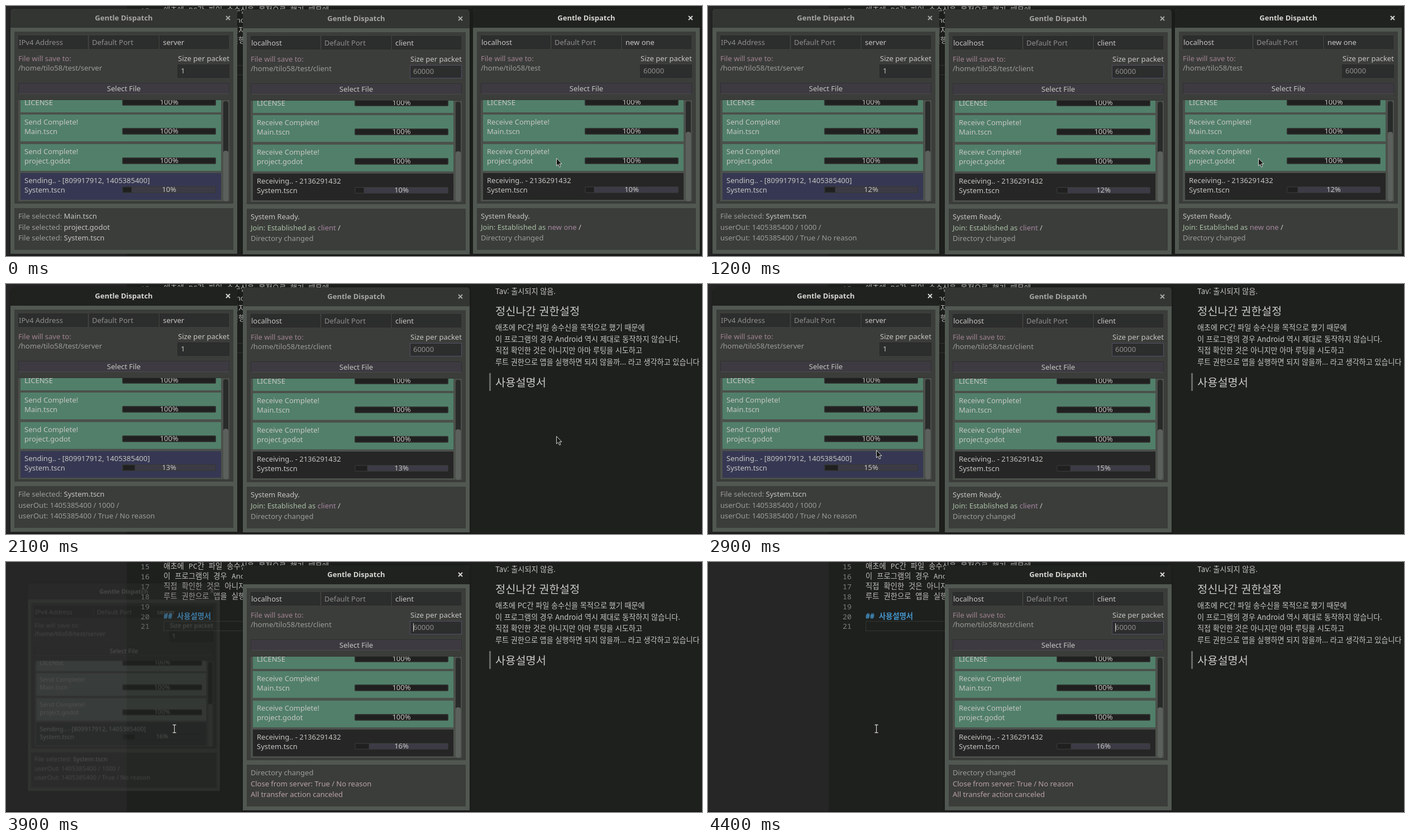
An HTML page for the animation above (4.9 s loop, 1246 px wide and 449 px high).

```html
<!DOCTYPE html>
<html lang="ko">
<head>
<meta charset="utf-8">
<title>Gentle Dispatch</title>
<style>
html, body { margin: 0; width: 100%; height: 100%; overflow: hidden; background: #1e201e; }
body { position: relative; }
div, span.t, svg { position: absolute; box-sizing: border-box; }
#stage { left: 0; top: 0; width: 1246px; height: 449px; overflow: hidden; background: #1e201e;
  font: 500 13px/20px "Noto Sans", "Open Sans", sans-serif; color: #c6c6c2; }
.t { white-space: pre; line-height: 20px; }
.dim { color: #9c9d99; }
.hint { color: #8f908d; }
.pink { color: #a08391; }
.rose { color: #b9a1a8; }
.name { color: #a585a0; }
.ok { color: #a9c0a5; }
.mid { text-align: center; white-space: pre; }

/* editor and preview behind the windows */
.side { background: #252625; }
.code { font: 13.3px/20px "Noto Sans Mono", "Noto Sans CJK KR", "Noto Sans CJK", monospace; color: #c0c1bd; }
.no { color: #7d807c; }
.head { color: #4596cd; font-weight: 700; }
.doc { font: 13.1px/20px "Noto Sans CJK KR", "Noto Sans CJK", sans-serif; color: #c8c9c5; }
.big { font-size: 19.8px; }
.line { border: 1px solid #343633; }
.rule { background: #666966; }
.edge { background: #101110; }

/* transfer window */
.win { background: #515751; border-radius: 6px 6px 0 0; box-shadow: 0 0 5px rgba(0,0,0,.3); }
.title { background: #333533; color: #a6a7a3; border-radius: 6px 6px 0 0; font-weight: 700; line-height: 33px; }
.title svg { left: 385px; top: 12px; stroke: currentColor; stroke-width: 2; }
.active .title { background: #20221f; color: #d6d6d2; }
.panel { background: #3b3d3a; }
.field { background: #2c2d2d; border: 1px solid #282929; }
.lit { border-color: #505066; }
.button { background: #3d3a41; border: 1px solid #302f33; border-bottom-color: #4b494e; line-height: 18px; }
.list { background: #4b504b; border: solid #343734; border-width: 1px 0; overflow: hidden; }
.done { background: #517f6a; }
.send { background: #363853; }
.recv { background: #252625; }
.bar { background: #3c3b45; border: 1px solid #333634; border-radius: 2px; }
.fill { background: #1f201f; border: 1px solid #2a2c2a; }
.track { background: #292a2a; border-radius: 4px; }
.thumb { background: #5c605c; border-radius: 4px; }
.caret { background: #d0d0cc; visibility: hidden; }
.active .caret { visibility: visible; }
[hidden] { display: none; }

#server { animation: shutLeft 4900ms step-end infinite; }
#extra { animation: shutRight 4900ms step-end infinite; }
#arrow { left: 0; top: 0; animation: point 4900ms step-end infinite; }
#beam { left: 297px; top: 291px; animation: beam 4900ms step-end infinite; }
@keyframes shutRight {
  0% { opacity: 1; transform: none; filter: none; }
  26.53% { opacity: .1; transform: scale(.83); filter: grayscale(.8); }
  28.57% { opacity: .05; transform: scale(.81); filter: grayscale(.8); }
  30.61% { opacity: .02; transform: scale(.8); filter: grayscale(.8); }
  32.65%, 100% { opacity: 0; transform: scale(.8); filter: grayscale(.8); }
}
@keyframes shutLeft {
  0% { opacity: 1; transform: none; filter: none; }
  79.59% { opacity: .28; transform: scale(.847); filter: grayscale(.8); }
  81.63% { opacity: .08; transform: scale(.81); filter: grayscale(.8); }
  83.67%, 100% { opacity: 0; transform: scale(.8); filter: grayscale(.8); }
}
@keyframes point {
  0% { transform: translate(984px, 272px); opacity: 1; }
  48.97% { transform: translate(984px, 272px); animation-timing-function: steps(3); }
  55.1% { transform: translate(500px, 258px); animation-timing-function: steps(2); }
  59.18% { transform: translate(300px, 297px); opacity: 1; }
  79.59%, 100% { transform: translate(300px, 297px); opacity: 0; }
}
@keyframes beam {
  0% { opacity: 0; }
  79.59%, 100% { opacity: 1; }
}
</style>
</head>
<body>
<div id="stage"></div>
<script>
const LOOP = 4900;
const stage = document.getElementById('stage');

const text = (x, y, s, c = '') =>
  `<span class="t ${c}" style="left:${x}px;top:${y - 10}px">${s}</span>`;
const box = (x, y, w, h, c, inner = '', id = '') =>
  `<div ${id && `id="${id}"`} class="${c}" style="left:${x}px;top:${y}px;width:${w}px;height:${h}px">${inner}</div>`;
const tint = (c, s) => `<span class="${c}">${s}</span>`;

const PROSE = [
  '애초에 PC간 파일 송수신을 목적으로 했기 때문에',
  '이 프로그램의 경우 Android 역시 제대로 동작하지 않습니다.',
  '직접 확인한 것은 아니지만 아마 루팅을 시도하고',
  '루트 권한으로 앱을 실행하면 되지 않을까... 라고 생각하고 있습니다'
];

function backdrop() {
  let code = box(0, 0, 216, 449, 'side') + box(282, 106, 540, 18, 'line');
  let doc = text(876, 13, 'Tav: 출시되지 않음.', 'doc') + text(876, 48, '정신나간 권한설정', 'doc big');
  for (let i = 0; i < 7; i++) code += text(241, 8 + i * 17.9, 15 + i, 'code no');
  PROSE.forEach((s, i) => {
    code += text(282, 7 + i * 17.9, s, 'code');
    doc += text(876, 78 + i * 20.7, s, 'doc');
  });
  code += text(282, 96.5, '## 사용설명서', 'code head');
  doc += box(865, 160, 3, 32, 'rule') + text(876, 176, '사용설명서', 'doc big');
  return code + doc + box(0, 448, 1246, 1, 'edge');
}

function card(i, kind, status, name) {
  const live = kind !== 'done';
  const fill = box(0, 0, 166, 10, live ? 'fill live' : 'fill');
  const label = `<div class="mid${live ? ' pct' : ''}" style="left:0;width:166px;top:-6px">100%</div>`;
  return box(4, 131 - 52.5 * (3 - i), 359, 48, kind,
    text(7, 13, status) + text(7, 30, name) + box(182, 24, 168, 12, 'bar', fill + label));
}

function win(o) {
  const done = o.verb + ' Complete!';
  const names = ['LICENSE', 'Main.tscn', 'project.godot'];
  const cards = names.map((n, i) => card(i, 'done', done, n)).join('') +
    card(3, o.kind, o.status, 'System.tscn');
  const cross = '<svg width="9" height="9"><path d="M1 1 8 8M8 1 1 8"/></svg>';
  const fields = o.fields.map(([s, c], i) =>
    box(14 + i * 126.5, 48, 124, 24, 'field') + text([15, 146, 273][i], 59.5, s, c)).join('');
  const logs = o.logs.map(lines => '<div class="log">' +
    lines.map((s, i) => text(14, 372 + i * 19.7, s)).join('') + '</div>').join('');
  return box(o.x, o.y, 406, 440, 'win',
    box(0, 0, 406, 34, 'title mid', 'Gentle Dispatch' + cross) +
    box(7, 41, 392, 309, 'panel') + box(7, 358, 392, 75, 'panel') +
    fields +
    text(14, 89, 'File will save to:', 'pink') + text(14, 106, o.path, 'dim') +
    text(300, 89, 'Size per packet') +
    box(299, 100, 93, 24, 'field' + (o.lit ? ' lit' : '')) +
    text(305, 111, o.size, o.size > 1 ? 'hint' : '') +
    (o.lit ? box(305, 104, 1, 15, 'caret') : '') +
    box(14, 133, 378, 20, 'button mid', 'Select File') +
    box(14, 163, 378, 184, 'list', cards +
      box(367, 2, 9, 180, 'track') + box(367, o.thumb, 9, 182 - o.thumb, 'thumb')) +
    logs, o.id);
}

const picked = n => tint('dim', 'File selected: ') + n;
const out = s => tint('dim', 'userOut: 1405385400 / ' + s);
const joined = n => tint('ok', 'Join: Established as ') + tint('name', n) + ' /';
const changed = tint('dim', 'Directory changed');
const closed = tint('rose', 'Close from server: True / No reason');
const canceled = tint('rose', 'All transfer action canceled');
const port = ['Default Port', 'hint'];

const serverLog = [picked('Main.tscn'), picked('project.godot'), picked('System.tscn'),
  out('1000 /'), out('True / No reason')];
const clientLog = ['System Ready.', joined('client'), changed, closed, canceled];
const views = log => [0, 1, 2].map(i => log.slice(i, i + 3));

const windows = [
  { id: 'server', x: 8, y: 5, verb: 'Send', kind: 'send', thumb: 91, size: '1',
    status: 'Sending.. - [809917912, 1405385400]', path: '/home/tilo58/test/server',
    fields: [['IPv4 Address', 'hint'], port, ['server']], logs: views(serverLog) },
  { id: 'client', x: 424, y: 6, verb: 'Receive', kind: 'recv', thumb: 91, size: '60000', lit: true,
    status: 'Receiving.. - 2136291432', path: '/home/tilo58/test/client',
    fields: [['localhost'], port, ['client']], logs: views(clientLog) },
  { id: 'extra', x: 836, y: 5, verb: 'Receive', kind: 'recv', thumb: 57, size: '60000',
    status: 'Receiving.. - 2136291432', path: '/home/tilo58/test',
    fields: [['localhost'], port, ['new one']],
    logs: [['System Ready.', joined('new one'), changed]] }
];

stage.innerHTML = backdrop() + windows.map(win).join('') +
  `<svg id="arrow" width="14" height="20"><path d="M1.5 1.5V15l3-2.7 2.3 5 2.2-1-2.2-4.8h4.2z"
    fill="#151615" stroke="#d4d4d0"/></svg>
  <svg id="beam" width="9" height="17"><path d="M1.5 1.5h6M1.5 15.5h6M4.5 1.5v14" stroke="#111" stroke-width="3"/>
    <path d="M1.5 1.5h6M1.5 15.5h6M4.5 1.5v14" stroke="#d4d4d0" stroke-width="1.3"/></svg>`;

const all = s => [...stage.querySelectorAll(s)];
const labels = all('.pct'), fills = all('.live');
const logSets = { server: all('#server .log'), client: all('#client .log') };
const frames = all('.win');

const showLog = (id, n) => logSets[id].forEach((el, i) => { el.hidden = i !== n; });
const passed = (t, ...marks) => marks.filter(m => t >= m).length;

function render(t) {
  const tick = Math.floor(t / 100) * 100;
  const value = 10 + Math.min(tick, 3200) / 3200 * 6;
  labels.forEach(el => { el.textContent = Math.floor(value) + '%'; });
  fills.forEach(el => { el.style.width = Math.round(value * 1.58) + 'px'; });
  showLog('server', passed(t, 800, 900));
  showLog('client', passed(t, 3400, 3500));
  const active = ['extra', 'server', 'client'][passed(t, 1300, 3900)];
  frames.forEach(el => el.classList.toggle('active', el.id === active));
}

let start;
function loop(now) {
  start ??= now;
  render((now - start) % LOOP);
  requestAnimationFrame(loop);
}
render(0);
requestAnimationFrame(loop);
</script>
</body>
</html>
```
